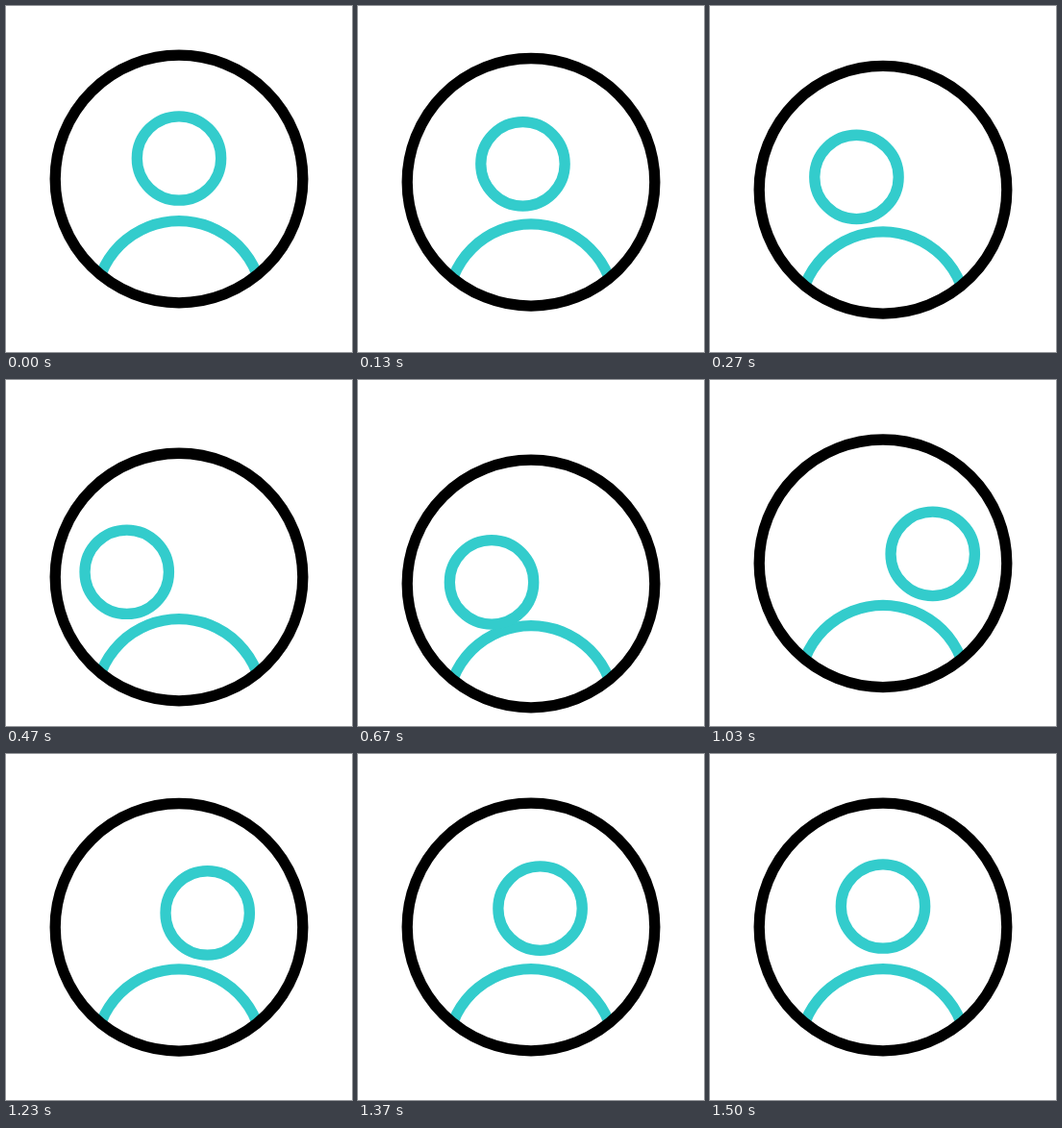
Write an HTML page with a canvas that moves like this. It is 360 px wide and 360 px high and loops after 2 s.

```html
<!DOCTYPE html>
<html lang="en">
<head>
<meta charset="utf-8">
<title>Profile icon</title>
<style>
  html, body { margin: 0; width: 100%; height: 100%; overflow: hidden; background: #fff; }
  canvas { display: block; }
</style>
</head>
<body>
<canvas id="stage" width="360" height="360"></canvas>
<script>
const ctx = document.getElementById("stage").getContext("2d");
const LOOP = 2000;
const FPS = 30;
const TEAL = "#33cccc";
const LINE = 11.3;

// Head offsets inside the ring; sag bends the path downwards on the way to a key.
const headKeys = [
  { t: 0, x: 0, y: 0, sag: 0 },
  { t: 552, x: -58, y: 17.3, sag: 0 },
  { t: 1013, x: 52, y: 11.7, sag: 6.6 },
  { t: 1500, x: 0, y: 0, sag: 0 }
];

const lerp = (a, b, k) => a + (b - a) * k;

function ease(t, start, end) {
  const k = Math.min(1, Math.max(0, (t - start) / (end - start)));
  return k * k * (3 - 2 * k);
}

function headOffset(t) {
  const next = headKeys.findIndex(key => key.t > t);
  if (next < 0) return { x: 0, y: 0 };
  const a = headKeys[next - 1];
  const b = headKeys[next];
  const k = ease(t, a.t, b.t);
  return { x: lerp(a.x, b.x, k), y: lerp(a.y, b.y, k) + 4 * b.sag * k * (1 - k) };
}

function ring(x, y, radius, color) {
  ctx.beginPath();
  ctx.arc(x, y, radius, 0, Math.PI * 2);
  ctx.strokeStyle = color;
  ctx.lineWidth = LINE;
  ctx.stroke();
}

function draw(t) {
  const drop = 32 * (ease(t, 0, 667) - ease(t, 667, 1267));
  const head = headOffset(t);

  ctx.fillStyle = "#fff";
  ctx.fillRect(0, 0, 360, 360);
  ctx.save();
  ctx.translate(0, drop);

  ctx.save();
  ctx.beginPath();
  ctx.arc(180, 180, 127, 0, Math.PI * 2);
  ctx.clip();
  ring(180, 310.6, 87, TEAL);
  ctx.restore();

  ring(180 + head.x, 158.5 + head.y, 43.7, TEAL);
  ring(180, 180, 128.8, "#000");
  ctx.restore();
}

function tick(now) {
  // Steps fall on whole frames, with their times rounded down to 10 ms.
  const frame = Math.floor((now % LOOP + 7) * FPS / 1000);
  draw(frame * 1000 / FPS);
  requestAnimationFrame(tick);
}

draw(0);
requestAnimationFrame(tick);
</script>
</body>
</html>
```
